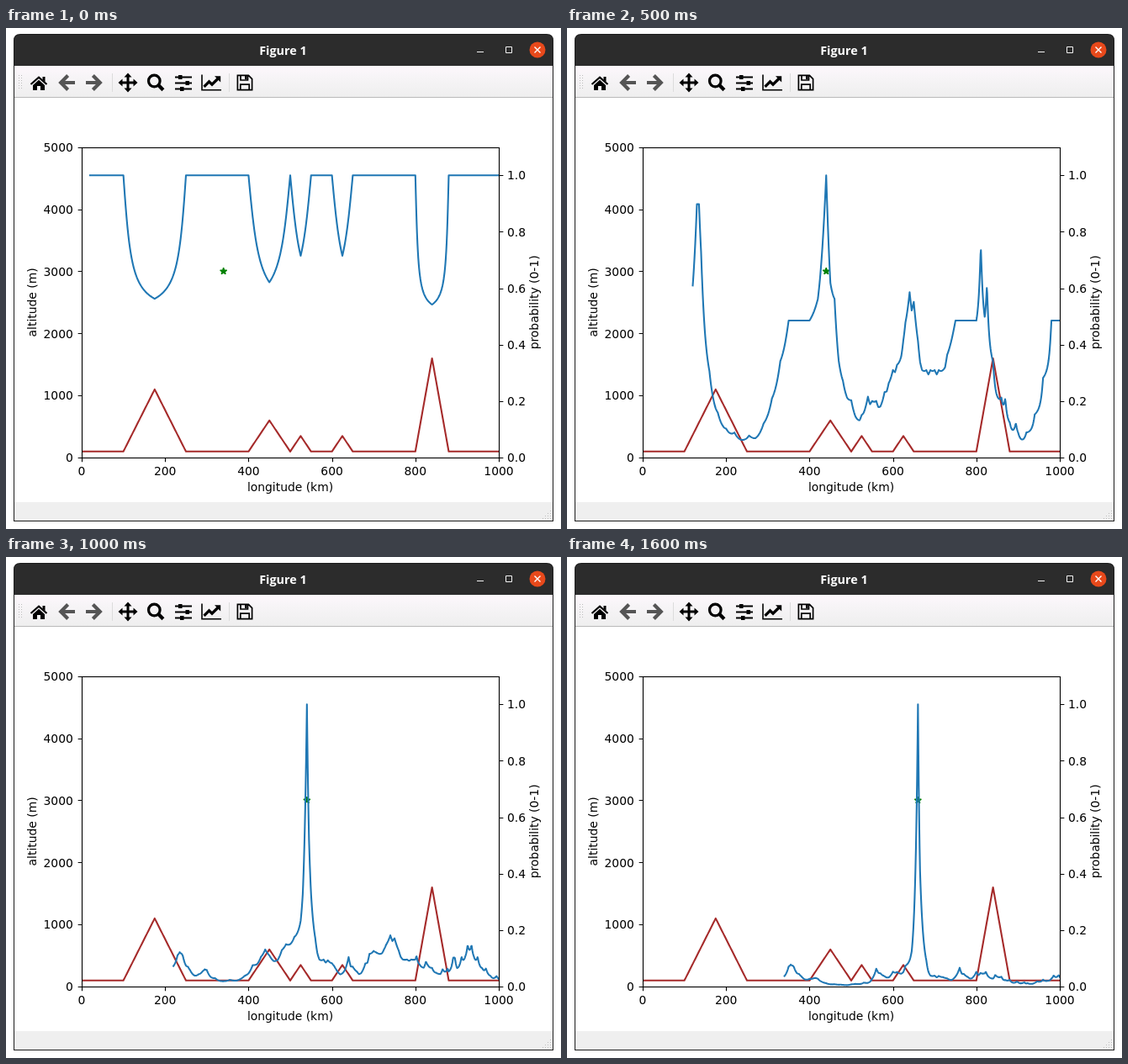
Write an HTML page that moves like this. It is 660 px wide and 596 px high and loops after 1700 ms.

```html
<!DOCTYPE html>
<html lang="en">
<head>
<meta charset="utf-8">
<title>Figure 1</title>
<style>
html, body { margin: 0; width: 100%; height: 100%; overflow: hidden; background: #fff; }
svg { display: block; }
.plot text { font: 13.89px "DejaVu Sans", sans-serif; fill: #000; }
.mid { text-anchor: middle; }
.end { text-anchor: end; }
.curve { fill: none; stroke-width: 2.08; stroke-linejoin: round; stroke-linecap: square; }
.icon { fill: none; stroke: #000; }
.solid { fill: #000; stroke: none; }
</style>
</head>
<body>
<svg width="660" height="596" viewBox="0 0 660 596">
  <defs>
    <linearGradient id="bar" x1="0" y1="0" x2="0" y2="1">
      <stop offset="0" stop-color="#fdf7fc"/>
      <stop offset=".4" stop-color="#f6f4f6"/>
      <stop offset="1" stop-color="#eeeeee"/>
    </linearGradient>
    <clipPath id="area"><rect x="90" y="141.6" width="496" height="369.6"/></clipPath>
  </defs>

  <!-- window -->
  <path d="M9 587V15Q9 7 17 7H643Q651 7 651 15V587Z" fill="#1d1d1d"/>
  <path d="M10 45V15Q10 8 17 8H643Q650 8 650 15V45Z" fill="#2c2c2c"/>
  <rect x="10" y="45" width="640" height="38" fill="url(#bar)"/>
  <rect x="10" y="82" width="640" height="1" fill="#b9b9b9"/>
  <rect x="10" y="83" width="640" height="481" fill="#fff"/>
  <rect x="10" y="564" width="640" height="22" fill="#efefef"/>
  <text class="mid" x="329.5" y="32" fill="#fff" style="font:700 14.4px 'Open Sans',sans-serif">Figure 1</text>
  <path d="M560 28.5h8M594.5 22.5h7v7h-7z" fill="none" stroke="#f4f4f4"/>
  <circle cx="632" cy="26" r="9.5" fill="#e8491b"/>
  <path d="M628.5 22.5l7 7m0-7l-7 7" stroke="#fff" stroke-width="1.4"/>

  <!-- toolbar -->
  <g id="dots" fill="#bdbdbd"></g>
  <path d="M126.5 54v22M265.5 54v22" stroke="#dcdcdc"/>
  <g class="icon">
    <path d="M29.5 67L39 58.6L48.5 67" stroke-width="2.2"/>
    <path class="solid" d="M43.5 58h3v6l-3-2.6zM32 68l7-6.2l7 6.2v6h-5v-5h-4v5h-5z"/>
    <g stroke="#555" stroke-width="4.2">
      <path d="M82 65H66M73.6 56.6L65.2 65L73.6 73.4"/>
      <path d="M95 65H111M103.4 56.6L111.8 65L103.4 73.4"/>
    </g>
    <path d="M137 65h16M145 57v16" stroke-width="3"/>
    <path class="solid" d="M145 53.5l4.5 5h-9zM145 76.5l4.5-5h-9zM133.5 65l5-4.5v9zM156.5 65l-5-4.5v9z"/>
    <circle cx="176.3" cy="63" r="6.8" stroke-width="3.2"/>
    <path d="M181.3 68l5.6 5.8" stroke-width="4.2"/>
    <path d="M201 58.5h20M201 65.5h20M201 72.5h20" stroke-width="1.8"/>
    <path class="solid" d="M205 56h4.5v5h-4.5zM213.5 63h4.5v5h-4.5zM207 70h4.5v5h-4.5z"/>
    <path d="M233 55.5V73.7H256" stroke-width="1.6"/>
    <path d="M235.5 69.8L241.5 63.8L245 67.2L252.3 60" stroke-width="3.3"/>
    <path class="solid" d="M248 57.3h7.2v7.2z"/>
    <path d="M275.4 56.4h13l4.2 4.2v13h-17.2zM279 56.4v5.6h8.5v-5.6M278.8 73.6v-6.4h10.4v6.4" stroke-width="1.7"/>
    <path class="solid" d="M284 57h2.6v4h-2.6z"/>
  </g>

  <!-- plot -->
  <g class="plot">
    <g clip-path="url(#area)">
      <path id="ground" class="curve" stroke="#a52a2a"/>
      <path id="star" fill="#008000" stroke="#008000" stroke-width="1.39" stroke-linejoin="bevel"/>
      <path id="belief" class="curve" stroke="#1f77b4"/>
    </g>
    <rect x="90.5" y="142.5" width="496" height="369" fill="none" stroke="#000" stroke-width="1.11"/>
    <g id="axes"></g>
    <text class="mid" x="338" y="551">longitude (km)</text>
    <text class="mid" transform="translate(36.3 326.4) rotate(-90)">altitude (m)</text>
    <text class="mid" transform="translate(633.2 326.4) rotate(-90)">probability (0-1)</text>
  </g>
</svg>
<script>
const $ = id => document.getElementById(id);
const STEP_MS = 100, STEPS = 17, SPEED = 20, START = 340, SCALE = 200;

// hills: left foot, right foot, summit height; the summit is halfway
const hills = [[100, 250, 1100], [400, 500, 600], [500, 550, 350], [600, 650, 350], [800, 880, 1600]];

const px = km => 90 + km * 0.496;
const altY = m => 511.2 - m * 0.07392;
const probY = p => 511.2 - p * 336;

function terrain(x) {
  const hill = hills.find(([a, b]) => x > a && x < b);
  if (!hill) return 100;
  const [a, b, top] = hill, half = (b - a) / 2;
  return 100 + (top - 100) * (1 - Math.abs(x - a - half) / half);
}

// tail weight of a Cauchy error
const likelihood = d => 1 - Math.atan(Math.abs(d) / SCALE) / Math.PI;

function belief(x, k) {
  let p = 1;
  for (let i = 0; i <= k; i++) {
    p *= likelihood(terrain(x - SPEED * (k - i)) - terrain(START + SPEED * i));
  }
  return p;
}

function curve(from, y) {
  let d = "";
  for (let x = from; x <= 1000; x++) d += (d ? "L" : "M") + px(x).toFixed(2) + " " + y(x).toFixed(2);
  return d;
}

function starPath(cx, cy) {
  const pts = [];
  for (let i = 0; i < 10; i++) {
    const r = i % 2 ? 1.59 : 4.17, a = i * Math.PI / 5;
    pts.push((cx + r * Math.sin(a)).toFixed(2) + " " + (cy - r * Math.cos(a)).toFixed(2));
  }
  return "M" + pts.join("L") + "Z";
}

function buildAxes() {
  const snap = v => Math.floor(v + 0.5) + 0.5;
  const label = (x, y, cls, s) => `<text x="${x}" y="${y}" class="${cls}">${s}</text>`;
  let ticks = "", labels = "";
  for (let i = 0; i < 6; i++) {
    const x = px(i * 200), yl = altY(i * 1000), yr = probY(i / 5);
    ticks += `M${snap(x)} 511.5v4.86M90.5 ${snap(yl)}h-4.86M586.5 ${snap(yr)}h4.86`;
    labels += label(x, 532, "mid", i * 200)
      + label(79.8, yl + 5.2, "end", i * 1000)
      + label(595.9, yr + 5.2, "", (i / 5).toFixed(1));
  }
  $("axes").innerHTML = `<path d="${ticks}" stroke="#000" stroke-width="1.11"/>` + labels;
}

function buildDots() {
  const dot = (x, y) => `<rect x="${x}" y="${y}" width="1" height="1"/>`;
  let s = "";
  for (let i = 0; i < 6; i++) s += dot(15, 56 + i * 3) + dot(18, 56 + i * 3);
  for (let r = 0; r < 4; r++) for (let c = 0; c <= r; c++) s += dot(647 - c * 3, 574 + r * 3);
  $("dots").innerHTML = s;
}

let shown = -1;
function draw(ms) {
  const k = Math.floor(ms / STEP_MS) % STEPS;
  if (k === shown) return;
  shown = k;
  $("star").setAttribute("d", starPath(px(START + SPEED * k), altY(3000)));
  $("belief").setAttribute("d", curve(SPEED * (k + 1), x => probY(belief(x, k))));
}

buildAxes();
buildDots();
$("ground").setAttribute("d", curve(0, x => altY(terrain(x))));

const t0 = performance.now();
function loop() {
  draw(performance.now() - t0);
  requestAnimationFrame(loop);
}
loop();
</script>
</body>
</html>
```
